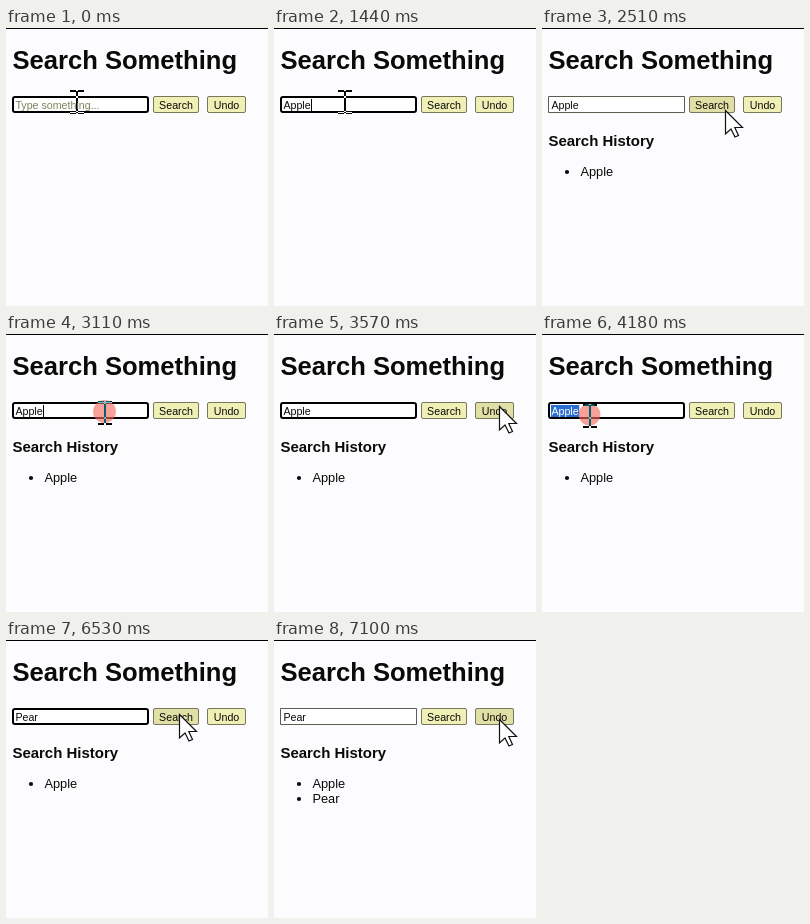
An HTML page with a canvas for the animation above (8 s loop, 262 px wide and 278 px high).

```html
<!DOCTYPE html>
<html>
<head>
<meta charset="utf-8">
<style>
  html, body { margin: 0; width: 100%; height: 100%; overflow: hidden; background: #fcfcff; }
  canvas { display: block; }
</style>
</head>
<body>
<canvas id="stage" width="262" height="278"></canvas>
<script>
const ctx = document.getElementById('stage').getContext('2d');
const LOOP = 8000;
const INK = '#0a0a08';
const FIELD = { x: 6, y: 68, w: 137, h: 17 };
const BUTTONS = [
  { label: 'Search', x: 147, y: 68, w: 46, h: 17 },
  { label: 'Undo', x: 201, y: 68, w: 39, h: 17 },
];

// Pointer path: [time, x, y]
const PATH = [
  [0, 71, 73], [1440, 71, 73], [1940, 184, 87], [2280, 184, 87], [2420, 200, 84],
  [2770, 99, 78], [3200, 99, 78], [3560, 225, 73], [3590, 225, 73], [3650, 160, 40],
  [3720, 80, 49], [3760, 73, 75], [3950, 73, 75], [4060, 48, 81], [6150, 48, 81],
  [6520, 173, 75], [6650, 173, 75], [6950, 175, 77], [7100, 225, 80], [LOOP, 225, 80],
];
const CLICKS = [1950, 2920, 4000, 6680];
const TYPING = [
  [0, ''], [490, 'A'], [840, 'App'], [910, 'Appl'], [1060, 'Apple'],
  [5470, 'P'], [5570, 'Pe'], [5670, 'Pea'], [5770, 'Pear'],
];

const within = (t, spans) => spans.some(([from, to]) => t >= from && t < to);
const isOver = (p, r, slack = 0) =>
  p.x >= r.x && p.x <= r.x + r.w && p.y >= r.y && p.y <= r.y + r.h + slack;

function pointerAt(t) {
  const i = PATH.findIndex(key => key[0] > t);
  const [t0, x0, y0] = PATH[i - 1], [t1, x1, y1] = PATH[i];
  const u = (t - t0) / (t1 - t0), ease = u * u * (3 - 2 * u);
  return { x: x0 + (x1 - x0) * ease, y: y0 + (y1 - y0) * ease };
}

function text(str, x, y, size, color = INK, weight = 'normal') {
  ctx.font = `${weight} ${size}px "Liberation Sans", Arial, sans-serif`;
  ctx.fillStyle = color;
  ctx.fillText(str, x, y);
}

function box(r, radius, fill, stroke, lineWidth) {
  const inset = lineWidth / 2;
  ctx.beginPath();
  ctx.roundRect(r.x + inset, r.y + inset, r.w - lineWidth, r.h - lineWidth, radius);
  ctx.fillStyle = fill;
  ctx.fill();
  ctx.strokeStyle = stroke;
  ctx.lineWidth = lineWidth;
  ctx.stroke();
}

function drawField(t) {
  const focused = within(t, [[0, 1980], [2940, 6700]]);
  const selected = within(t, [[4100, 5470]]);
  const caret = within(t, [[190, 1800], [2940, 3400], [5470, 6300]]);
  const value = TYPING.filter(key => key[0] <= t).pop()[1];
  box(FIELD, focused ? 2 : 0, '#fff', focused ? '#000' : '#5c5c50', focused ? 2 : 1);
  ctx.font = '10.67px "Liberation Sans", Arial, sans-serif';
  const width = ctx.measureText(value).width;
  if (selected) {
    ctx.fillStyle = '#2a6fd0';
    ctx.fillRect(9, 71, width + 1, 12);
  }
  if (value) text(value, 9.4, 81, 10.67, selected ? '#fff' : INK);
  else text('Type something...', 9.4, 81, 10.67, '#80805c');
  if (caret) {
    ctx.fillStyle = '#000';
    ctx.fillRect(Math.round(9.4 + width), 71, 1, 12);
  }
}

function drawHistory(t) {
  if (t < 2280) return;
  text('Search History', 6.4, 118, 14.98, INK, 'bold');
  const items = t < 6850 ? ['Apple'] : ['Apple', 'Pear'];
  items.forEach((item, i) => {
    text(item, 38.4, 148 + i * 15, 12.8);
    ctx.beginPath();
    ctx.arc(25, 144 + i * 15, 2.1, 0, Math.PI * 2);
    ctx.fill();
  });
}

function drawClick(t, p) {
  const start = CLICKS.find(c => t >= c && t < c + 280);
  if (start === undefined) return;
  const age = t - start;
  ctx.globalAlpha = Math.min(0.62, (280 - age) / 100);
  ctx.fillStyle = '#f4675c';
  ctx.beginPath();
  ctx.arc(p.x - 0.5, p.y - 0.5, Math.min(12, age * 0.06), 0, Math.PI * 2);
  ctx.fill();
  ctx.globalAlpha = 1;
}

function drawPointer(p) {
  ctx.save();
  ctx.translate(Math.round(p.x), Math.round(p.y));
  if (isOver(p, FIELD)) {
    // The text cursor inverts what lies beneath it
    ctx.globalCompositeOperation = 'difference';
    ctx.fillStyle = '#fff';
    ctx.fillRect(-1, -10, 2, 21);
    for (const y of [-11, 11]) {
      ctx.fillRect(-7, y, 6, 2);
      ctx.fillRect(1, y, 6, 2);
    }
  } else {
    ctx.beginPath();
    [[0, 0], [0, 23.5], [5.5, 18.5], [9.5, 26.5], [13, 25], [9.3, 17], [17, 17]]
      .forEach(([x, y]) => ctx.lineTo(x + 0.5, y - 0.5));
    ctx.closePath();
    ctx.fillStyle = '#fff';
    ctx.fill();
    ctx.strokeStyle = '#111';
    ctx.lineWidth = 1.2;
    ctx.stroke();
  }
  ctx.restore();
}

function draw(t) {
  const pointer = pointerAt(t);
  const visible = !within(t, [[490, 1440], [5470, 6150]]);
  ctx.fillStyle = '#fcfcff';
  ctx.fillRect(0, 0, 262, 278);
  ctx.fillStyle = '#000';
  ctx.fillRect(0, 0, 262, 1);
  text('Search Something', 6.4, 41, 25.6, INK, 'bold');
  drawField(t);
  for (const b of BUTTONS) {
    const hover = visible && isOver(pointer, b, 3);
    box(b, 1.5, hover ? '#e0e0a6' : '#f0f0b6', '#77775c', 1);
    ctx.textAlign = 'center';
    text(b.label, b.x + b.w / 2, 81, 10.67);
    ctx.textAlign = 'left';
  }
  drawHistory(t);
  if (visible) {
    drawClick(t, pointer);
    drawPointer(pointer);
  }
}

function frame() {
  draw(performance.now() % LOOP);
  requestAnimationFrame(frame);
}
frame();
</script>
</body>
</html>
```
